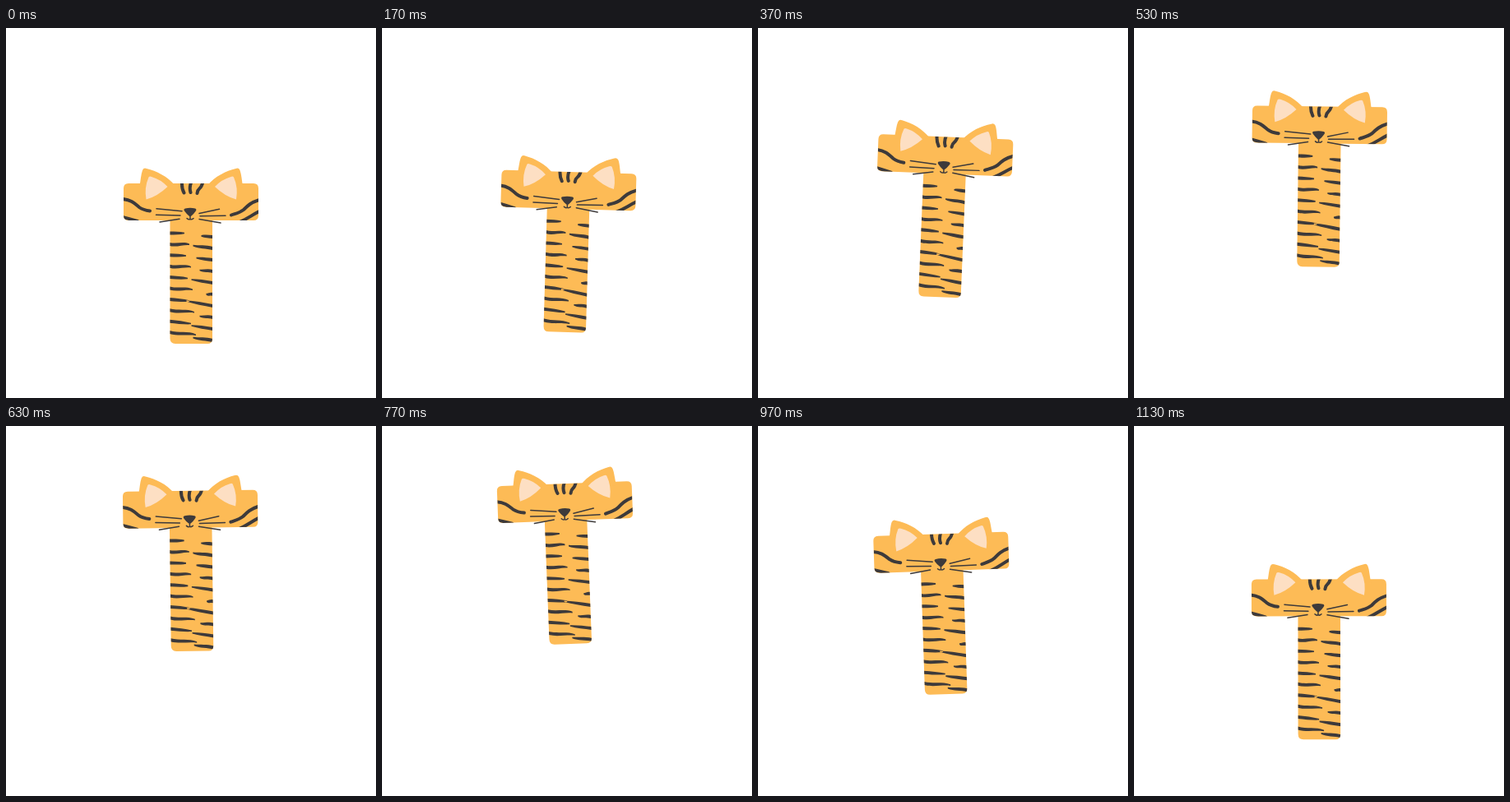
These frames come from a looping animation (450 px wide and 450 px high, 1160 ms). An HTML page:

```html
<!DOCTYPE html>
<html lang="en">
<head>
<meta charset="utf-8">
<title>Jumping tiger T</title>
<style>
  html, body { margin: 0; width: 100%; height: 100%; overflow: hidden; background: #fff; }
  svg { display: block; width: 100vw; height: 100vh; }
  .fur { fill: #fdbb56; }
  .inner { fill: #fddfc3; }
  .dark { fill: #3d3a3b; }
  .line { fill: none; stroke: #3d3a3b; stroke-width: 1.5; stroke-linecap: round; }
  .thick { stroke-width: 4; }
</style>
</head>
<body>
<svg viewBox="0 0 450 450">
  <defs>
    <path id="body" d="M149 189H301Q307 189 307 195V228Q307 234 301 234H251V378Q251 384 245 384H206Q199.500 384 199.500 377.500V234H149Q143 234 143 228V195Q143 189 149 189Z"/>
    <g id="ear">
      <path class="fur" d="M162 194C164 185 164 178 166 173Q167.500 169.500 171 171C183 174 196 180 206 192Z"/>
      <path class="inner" d="M173.500 181.500Q174.500 180 177 181Q188 184 196.500 193Q184 205 170.500 208.500Q168 194 173.500 181.500Z"/>
    </g>
    <clipPath id="bodyClip"><use href="#body"/></clipPath>
  </defs>
  <g id="tiger">
    <use class="fur" href="#body"/>
    <use href="#ear"/>
    <use href="#ear" transform="matrix(-1 0 0 1 450.500 0)"/>
    <g clip-path="url(#bodyClip)">
      <path id="stripes" class="dark"/>
      <path class="line thick" d="M142 208C152 209 156 213 162 218C166 221 171 222 175 222.500M142 230Q150 232 160 235"/>
      <path class="line thick" d="M308 209C298 212 294 216 289 221C284 225 278 226 274 227.500M308 223C298 228 294 232 284 236"/>
      <path class="line thick" d="M214 187Q213.500 195 216.500 200.500M225.500 187Q222.500 194 224.500 200M239.500 187Q238 193 235.500 195T232.500 201"/>
    </g>
    <path class="dark" d="M218 219.500Q224 218 230 219.500Q232.500 220.500 230.500 223Q228 226.500 225.500 228.500Q224 229.500 222.500 228.500Q219.500 226 217 222.500Q215.500 220 218 219.500Z"/>
    <path class="line" d="M224 228V232M220 231.500Q222 233.500 224 232.500Q226 233.500 228 231.500M183 219.800L214 222.800M182.500 227.300L212 228M187 236L211 232.300M235 225.500L259.500 220.300M236 228.800L267 228.300M235 232.500L261 237"/>
  </g>
</svg>
<script>
const LOOP = 1160;

// Slightly wavy stripe from a blunt base at the edge to a thin tip.
function stripe(x, y, length, rise, wave) {
  const h = 2, tip = .8;
  const a = x + length * .35, b = x + length * .7;
  const ya = y - rise * .35 + wave, yb = y - rise * .7 - wave;
  return `M${x} ${y - h}C${a} ${ya - h} ${b} ${yb - h} ${x + length} ${y - rise - tip}` +
         `v${2 * tip}C${b} ${yb + h} ${a} ${ya + h} ${x} ${y + h}Z`;
}

let stripes = "";
for (let i = 0; i < 10; i++) {
  const odd = i % 2;
  const left = 18 + i + 5 * odd;
  const right = odd ? 8 + 4 * Math.abs(i - 5) : 32 - 3 * Math.abs(i - 6);
  stripes += stripe(199, 249.5 + 13.4 * i, left, -.35 * i, 2 * odd);
  stripes += stripe(251.5, 254 + 14 * i, -right, 6 * (right / 32) ** 2, -odd);
}
document.getElementById("stripes").setAttribute("d", stripes);

// Cosine-eased interpolation through [time, value] keys.
function track(keys, t) {
  const i = keys.findIndex(([time]) => time > t);
  const [t0, v0] = keys[i - 1], [t1, v1] = keys[i];
  return v0 + (v1 - v0) * (1 - Math.cos(Math.PI * (t - t0) / (t1 - t0))) / 2;
}

const lift = [[0, 0], [765, -119], [1170, 0]];
const tilt = [[0, 0], [LOOP / 4, 2.6], [LOOP * 3 / 4, -2.6], [LOOP, 0]];
const tiger = document.getElementById("tiger");
const start = performance.now();

function draw() {
  const t = (performance.now() - start) % LOOP;
  tiger.setAttribute("transform", `translate(0 ${track(lift, t)}) rotate(${track(tilt, t)} 225 277)`);
  requestAnimationFrame(draw);
}
draw();
</script>
</body>
</html>
```
